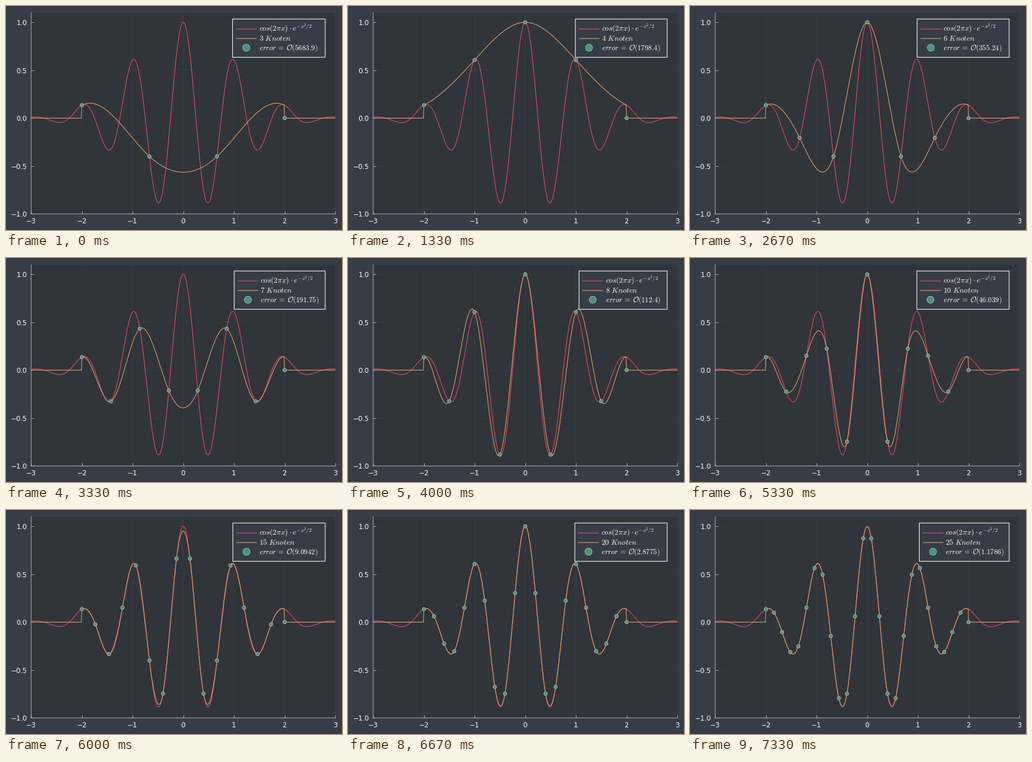
Write a matplotlib script that moves like this. It is 600 by 400 pixels and loops after 8 s.

```python
import numpy as np
import matplotlib.pyplot as plt
from matplotlib.animation import FuncAnimation
from matplotlib.patches import Circle, Rectangle

W, H, DPI = 600, 400, 100
LOOP, INTERVAL = 8000, 40
BACK, PANEL, FORE = "#363D46", "#30343B", "#ADB2B7"
RED, ORANGE, GREEN = "#FE4365", "#ECA25C", "#3F9778"

# (number of intervals, left edge of the legend) for each equal step of the loop
STEPS = [(3, 404.5), (3, 404.5), (4, 406), (5, 405.5), (6, 405.5), (7, 407.5),
         (8, 412.5), (9, 408.5), (10, 405), (15, 405), (20, 405), (25, 409.5)]
LEGEND_RIGHT, LEGEND_TOP, LEGEND_BOTTOM = 570, 23.2, 91.6
ROWS = (41, 58, 74.5)
FOURTH_DERIVATIVE = (2 * np.pi) ** 4 + 6 * (2 * np.pi) ** 2 + 3

plt.rcParams.update({"font.family": "DejaVu Sans", "mathtext.fontset": "cm",
                     "path.snap": False})


def f(x):
    return np.cos(2 * np.pi * x) * np.exp(-x ** 2 / 2)


def clamped_spline(n):
    """Cubic spline of f on [-2, 2) with exact end slopes, zero elsewhere."""
    h = 4 / n
    knots = np.linspace(-2, 2, n + 1)
    y = f(knots)
    end_slope = 2 * np.exp(-2)
    slopes = np.concatenate([[end_slope], np.diff(y) / h, [-end_slope]])
    system = 4 * np.eye(n + 1) + np.eye(n + 1, k=1) + np.eye(n + 1, k=-1)
    system[0, 0] = system[n, n] = 2
    m = np.linalg.solve(system, 6 / h * np.diff(slopes))

    def evaluate(x):
        i = np.clip(((x + 2) / h + 1e-9).astype(int), 0, n - 1)
        b = (x - knots[i]) / h
        a = 1 - b
        s = a * y[i] + b * y[i + 1]
        s += ((a ** 3 - a) * m[i] + (b ** 3 - b) * m[i + 1]) * h * h / 6
        return np.where((x >= -2) & (x < 2), s, 0)

    return knots, evaluate


fig = plt.figure(figsize=(W / DPI, H / DPI), dpi=DPI, facecolor=BACK)

left, right, top, bottom = 45, 588, 12, 371.3
ax = fig.add_axes([left / W, 1 - bottom / H, (right - left) / W, (bottom - top) / H],
                  facecolor=PANEL)
ax.set(xlim=(-3, 3), ylim=(-1, 1.1))
ax.set_xticks(range(-3, 4))
ax.set_yticks([-1, -0.5, 0, 0.5, 1], ["−1.0", "−0.5", "0.0", "0.5", "1.0"])
ax.tick_params(direction="in", length=3.6, width=0.75, color=FORE,
               labelcolor="white", labelsize=8.7, pad=5.3)
ax.tick_params(axis="x", pad=4.7)
ax.grid(color=FORE, alpha=0.1, linewidth=0.5)
ax.set_axisbelow(True)
for side, spine in ax.spines.items():
    spine.set(color=FORE, linewidth=0.75, visible=side in ("left", "bottom"))

xs = np.round(np.arange(-300, 301) / 100, 2)
ax.plot(xs, f(xs), color=RED, lw=0.8)
curve, = ax.plot([], [], color=ORANGE, lw=0.8)
dots = ax.scatter([], [], facecolor=GREEN, edgecolor=FORE, lw=0.75, zorder=3)

# The legend lives on an overlay measured in pixels from the top left
overlay = fig.add_axes([0, 0, 1, 1], zorder=5)
overlay.set(xlim=(0, W), ylim=(H, 0))
overlay.axis("off")
box = overlay.add_patch(Rectangle((0, LEGEND_TOP), 1, LEGEND_BOTTOM - LEGEND_TOP,
                                  fc=BACK, ec="white", lw=0.8))
keys = [overlay.plot([], [], color=c, lw=0.8)[0] for c in (RED, ORANGE)]
key_dot = overlay.add_patch(Circle((0, 0), 6.2, fc=GREEN, ec=FORE, lw=0.75))
labels = [overlay.text(0, y + 4.2, "", color="white", size=size, va="baseline")
          for y, size in zip(ROWS, (9.7, 9.7, 9.3))]
labels[0].set_text(r"$cos(2\pi x)\cdot e^{-x^2/2}$")


def draw(frame):
    # Steps start on the last tick before their due time
    step = int((frame * INTERVAL + 34) * len(STEPS) / LOOP)
    n, x0 = STEPS[step]
    knots, spline = clamped_spline(n)
    curve.set_data(xs, spline(xs))
    dots.set_offsets(np.column_stack([knots, spline(knots)]))
    # One size per dot keeps their positions off the pixel grid
    dots.set_sizes(np.full(n + 1, 4.4 ** 2), DPI)

    box.set_x(x0)
    box.set_width(LEGEND_RIGHT - x0)
    for key, y in zip(keys, ROWS):
        key.set_data([x0 + 6.5, x0 + 42.5], [y, y])
    key_dot.center = x0 + 24.5, ROWS[2]
    for label in labels:
        label.set_x(x0 + 47)
    error = FOURTH_DERIVATIVE * (4 / n) ** 4
    labels[1].set_text(rf"${n}\ Knoten$")
    labels[2].set_text(rf"$error\,=\,\mathcal{{O}}({error:.5g})$")
    return curve, dots, box, key_dot, *keys, *labels


anim = FuncAnimation(fig, draw, frames=LOOP // INTERVAL, interval=INTERVAL,
                     repeat=True, repeat_delay=0)
plt.show()
```
